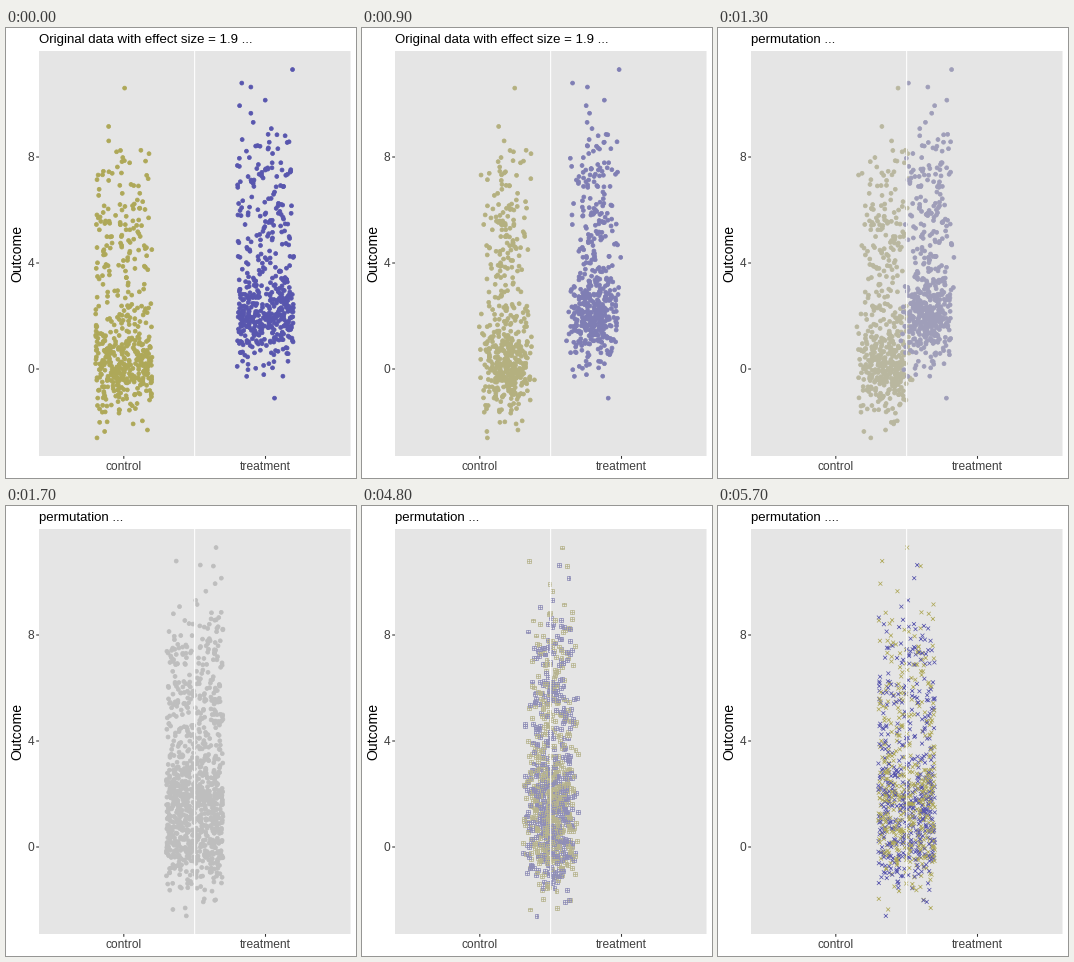
Write a matplotlib script that moves like this. It is 350 px wide and 450 px high and loops after 8 s.

```python
import numpy as np
import matplotlib.pyplot as plt
from matplotlib.animation import FuncAnimation
from matplotlib.path import Path

W, H, DPI = 350, 450, 100
PX = 72 / DPI                      # one pixel in points
LEFT, RIGHT, TOP, BOTTOM = 33, 344.5, 23, 428
CONTROL, MIDDLE, TREATMENT = 117.8, 188.65, 259.5
ZERO, UNIT, SPREAD = 341, 26.5, 28.3
POOL_START, RELABEL_START, STEPS = 4, 42, 13
KHAKI_BLUE = np.array([(174, 168, 88), (88, 86, 174)]) / 255
GREY = np.full(3, 190 / 255)

plt.rcParams["font.family"] = "Liberation Sans"
rng = np.random.default_rng(19)


# ---- data -----------------------------------------------------------------
def outcomes(n, core, tail, lo, hi):
    """Dense core with a wide upper cluster, spanning exactly lo..hi."""
    in_tail = rng.random(2 * n) < 0.28
    v = np.where(in_tail, rng.normal(*tail, 2 * n), rng.normal(*core, 2 * n))
    v = v[(v > lo) & (v < hi)]
    return np.r_[lo, hi, v[:n - 2]]


def jitter(centre):
    return centre + rng.uniform(-SPREAD, SPREAD, len(group))


N = 500
y = ZERO - UNIT * np.r_[outcomes(N, (0.2, 1.0), (5.0, 1.6), -2.6, 10.6),
                        outcomes(N, (2.1, 0.95), (6.2, 1.9), -1.1, 11.3)]
group = np.repeat([0, 1], N)
shuffled = rng.permutation(group)
x_split = jitter(np.where(group == 0, CONTROL, TREATMENT))
x_pooled = jitter(MIDDLE)
x_mixed = jitter(MIDDLE)

# ---- plotting symbols, in pixels, y upwards -------------------------------
R = 1.95
D = R * np.sqrt(2)


def poly(*pts):
    return Path([*pts, pts[0]], closed=True)


def strokes(*segments):
    return Path(np.array(segments).reshape(-1, 2),
                [Path.MOVETO, Path.LINETO] * len(segments))


def plus(r):
    return strokes([(-r, 0), (r, 0)], [(0, -r), (0, r)])


def triangle(up):
    base = -up * 0.778 * R
    return poly((0, up * 1.555 * R), (1.347 * R, base), (-1.347 * R, base))


join = Path.make_compound_path
disc = Path.circle((0, 0), R)
square = poly((-R, -R), (R, -R), (R, R), (-R, R))
diamond = poly((0, -D), (D, 0), (0, D), (-D, 0))
cross = strokes([(-R, -R), (R, R)], [(-R, R), (R, -R)])

SYMBOLS = {
    19: disc, 17: triangle(1), 16: disc, 15: square,
    14: join(square, poly((0, R), (R, -R), (-R, -R))),
    13: join(disc, cross), 12: join(square, plus(R)),
    10: join(disc, plus(R)), 9: join(diamond, plus(D)),
    8: join(cross, plus(D)), 7: join(square, cross),
    6: triangle(-1), 5: diamond, 4: cross,
}

# ---- stage ----------------------------------------------------------------
fig = plt.figure(figsize=(W / DPI, H / DPI), dpi=DPI, facecolor="white")
ax = fig.add_axes([0, 0, 1, 1])
ax.set_xlim(0, W)
ax.set_ylim(H, 0)
ax.axis("off")


def label(px, py, text, size, color="#404040", va="baseline", **kw):
    return ax.text(px, py, text, fontsize=size * PX, color=color, va=va, **kw)


def line(xs, ys, color="#333333", z=1):
    ax.plot(xs, ys, color=color, lw=1.07 * PX, zorder=z,
            solid_capstyle="butt", snap=False)


ax.add_patch(plt.Rectangle((LEFT, TOP), RIGHT - LEFT, BOTTOM - TOP,
                           fc="#e5e5e5", ec="none", zorder=0, snap=False))
line([MIDDLE, MIDDLE], [TOP, BOTTOM], "white", z=3)

for value in (0, 4, 8):
    ty = ZERO - UNIT * value
    line([LEFT - 2.8, LEFT], [ty, ty])
    label(28, ty + 4.3, str(value), 12, ha="right")
for tx, name in ((CONTROL, "control"), (TREATMENT, "treatment")):
    line([tx, tx], [BOTTOM, BOTTOM + 2.8])
    label(tx, 442, name, 12, ha="center")

label(18.6, 226, "Outcome", 14, "black", rotation=90, ha="right", va="center")
title = label(LEFT, 15, "", 13.2, "black", ha="left")
# scatter keeps symbols in screen units, whatever path they are given
dots = ax.scatter(x_split, y, s=PX ** 2, zorder=2)


# ---- motion ---------------------------------------------------------------
def progress(i, start):
    return min(max((i - start) / STEPS, 0), 1)


def mix(a, b, t):
    return a + (b - a) * t


def update(i):
    pool = progress(i, POOL_START)
    relabel = progress(i, RELABEL_START)

    if relabel > 0:
        x = mix(x_pooled, x_mixed, relabel)
        colors = mix(GREY, KHAKI_BLUE, relabel)[shuffled]
    else:
        x = mix(x_split, x_pooled, pool)
        colors = mix(KHAKI_BLUE, GREY, pool)[group]

    # the symbol number counts down from a dot (19) to a cross (4)
    code = int(mix(19, 4, relabel))
    dots.set_paths([SYMBOLS[code]])
    dots.set_offsets(np.c_[x, y])
    dots.set_facecolor(colors if code >= 15 else "none")
    dots.set_edgecolor(colors)
    dots.set_linewidth(0 if 15 <= code <= 17 else 0.75 * PX)

    if relabel > 0.5:
        title.set_text("permutation ....")
    elif pool > 0.5:
        title.set_text("permutation ...")
    else:
        title.set_text("Original data with effect size = 1.9 ...")
    return dots, title


def reset():
    return update(0)


anim = FuncAnimation(fig, update, frames=80, init_func=reset, interval=100,
                     repeat=True, repeat_delay=0, blit=False)
plt.show()
```
